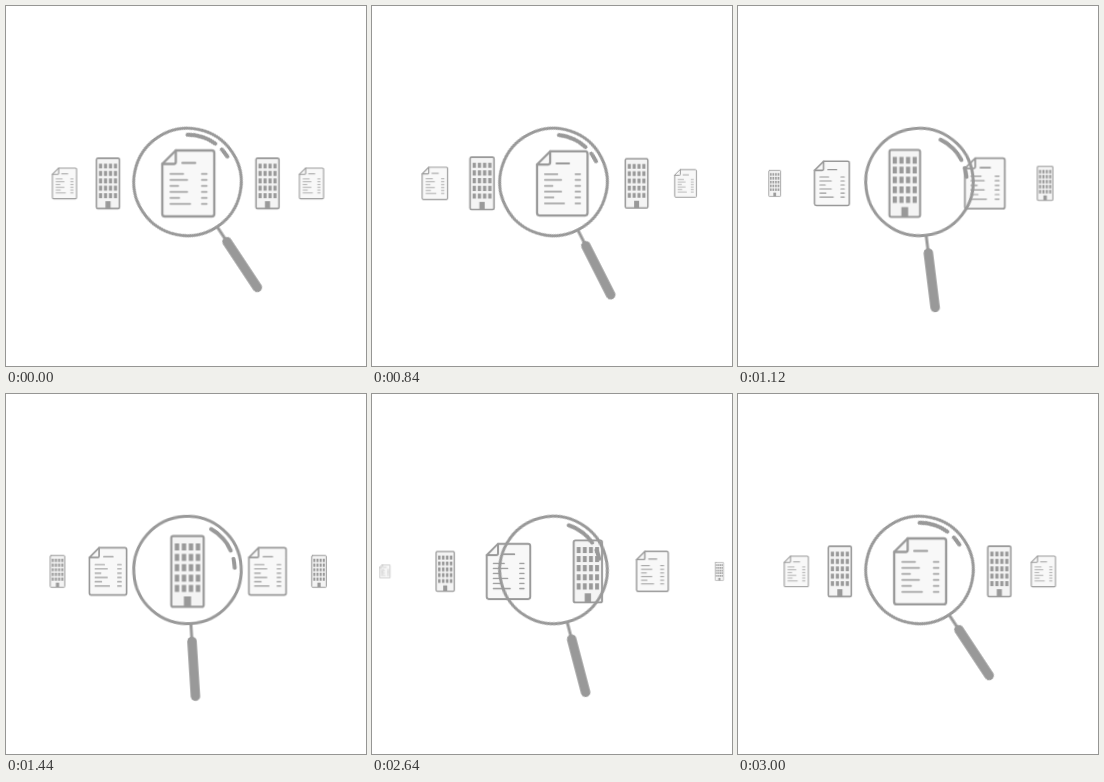
Recreate the animation shown at these times as an HTML page. Size 360 by 360 pixels, loop 3.04 s.

```html
<!DOCTYPE html>
<html lang="en">
<head>
<meta charset="utf-8">
<title>Document search</title>
<style>
html, body { margin: 0; width: 100%; height: 100%; overflow: hidden; background: #fff; }
svg { display: block; width: 100vw; height: 100vh; }
.ink { fill: none; stroke: #999; stroke-linecap: round; stroke-linejoin: round; }

/* Each item holds place a, slides to b, holds, then slides to c. */
.item { animation: slide 3040ms cubic-bezier(.65, 0, .35, 1) infinite; }
.late { animation-name: slide-late; }
.lens { animation: swing 3040ms cubic-bezier(.65, 0, .35, 1) infinite; }

@keyframes slide {
  0%, 20.13% { transform: translate(var(--xa), 177.4px) scale(var(--sa)); }
  46.3%, 75% { transform: translate(var(--xb), 177.4px) scale(var(--sb)); }
  100% { transform: translate(var(--xc), 177.4px) scale(var(--sc)); }
}
@keyframes slide-late {
  0% { transform: translate(var(--xa), 177.4px) scale(var(--sa)); }
  20.13% {
    transform: translate(var(--xa), 177.4px) scale(var(--sa));
    animation-timing-function: cubic-bezier(.85, 0, .15, 1);
  }
  46.3%, 75% { transform: translate(var(--xb), 177.4px) scale(var(--sb)); }
  100% { transform: translate(var(--xc), 177.4px) scale(var(--sc)); }
}
@keyframes swing {
  0%, 16.38% { transform: translate(181.5px, 176px) rotate(56.5deg); }
  45.86%, 75.99% { transform: translate(181.5px, 176px) rotate(86.4deg); }
  100% { transform: translate(181.5px, 176px) rotate(56.5deg); }
}
</style>
</head>
<body>
<svg viewBox="0 0 360 360">
  <defs>
    <g id="doc" class="ink">
      <path d="M-12.5-33H23.5Q26-33 26-30.5V30.5Q26 33 23.5 33H-23.5Q-26 33-26 30.5V-19.5Z" fill="#f8f8f8" stroke-width="2.3"/>
      <path d="M-12.5-33V-21.5Q-12.5-19.5-14.5-19.5H-26" stroke-width="2.3"/>
      <path d="M-6-20.5H7" stroke-width="2"/>
      <path d="M-18-9.5h13M-18-3.5h17M-18 2.5h8M-18 8.5h17M-18 14.5h9M-18 20.5h20" stroke-width="1.6"/>
      <path d="M13.5-9.5h5m-5 6h5m-5 6h5m-5 6h5m-5 6h5m-5 6h5" stroke-width="1.6"/>
    </g>
    <g id="tower" class="ink">
      <rect x="-16.2" y="-35.4" width="32.4" height="70.8" rx="2" fill="#f4f4f4" stroke-width="2.2"/>
      <path id="row" d="M-10.5-28v7M-3.5-28v7M3.5-28v7M10.5-28v7" stroke-width="4.4" stroke-linecap="butt"/>
      <use href="#row" y="10.4"/>
      <use href="#row" y="20.8"/>
      <use href="#row" y="31.2"/>
      <use href="#row" y="41.6"/>
      <path d="M-3.6 25H3.6V35.4H-3.6Z" fill="#999" stroke="none"/>
    </g>
  </defs>

  <use class="item" href="#doc" style="--xa:-21.5px;--sa:0;--xb:-21.5px;--sb:0;--xc:58.5px;--sc:.465"/>
  <use class="item" href="#tower" style="--xa:-28.5px;--sa:0;--xb:51.5px;--sb:.45;--xc:102px;--sc:.71"/>
  <use class="item" href="#doc" style="--xa:58.5px;--sa:.465;--xb:102px;--sb:.715;--xc:182.3px;--sc:1"/>
  <use class="item" href="#tower" style="--xa:102px;--sa:.71;--xb:181.5px;--sb:1;--xc:261.5px;--sc:.71"/>
  <use class="item" href="#doc" style="--xa:182.3px;--sa:1;--xb:261.5px;--sb:.715;--xc:305.5px;--sc:.465"/>
  <use class="item late" href="#tower" style="--xa:261.5px;--sa:.71;--xb:313px;--sb:.45;--xc:393px;--sc:0"/>
  <use class="item" href="#doc" style="--xa:305.5px;--sa:.465;--xb:385.5px;--sb:0;--xc:385.5px;--sc:0"/>

  <g class="lens ink">
    <circle r="53.7" stroke-width="3"/>
    <path d="M-39.4-26.1A47.3 47.3 0 0 1-16.6-44.3M-8.2-46.6A47.3 47.3 0 0 1 .8-47.3" stroke-width="4"/>
    <path d="M55 0H72" stroke-width="3"/>
    <path d="M71.5 0H126.5" stroke-width="9.4"/>
  </g>
</svg>
</body>
</html>
```
